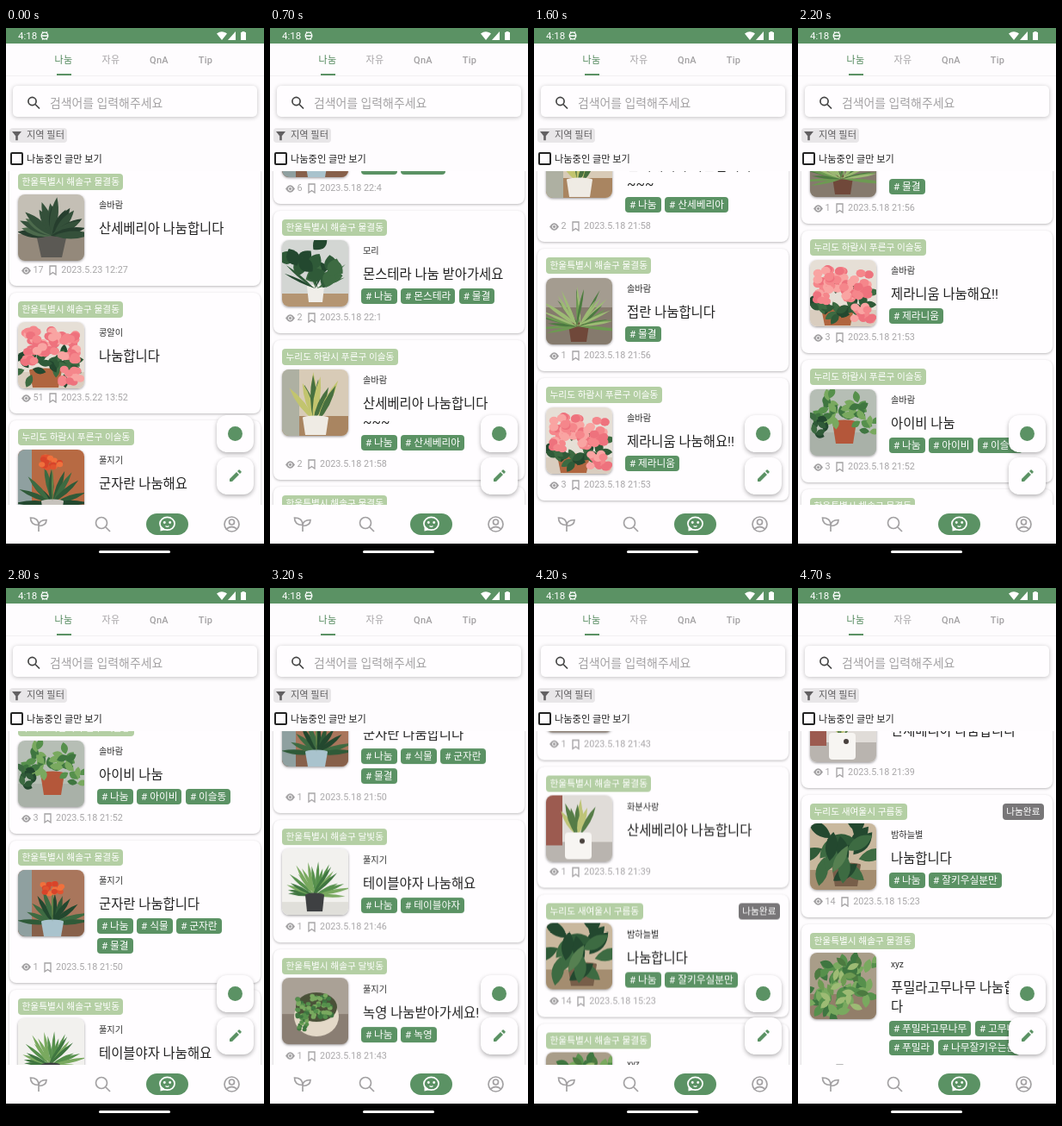
An HTML page that plays this animation: 300x617 px, repeating every 4.8 s.

```html
<!DOCTYPE html>
<html lang="ko">
<head>
<meta charset="utf-8">
<title>나눔 게시판</title>
<style>
  :root { --green: #5b9264; --light: #b4cfa4; --paper: #fefcfe; }
  html, body { margin: 0; width: 100%; height: 100%; overflow: hidden; }
  body {
    position: relative; background: var(--paper); color: #222;
    font: 11px/20px Roboto, "Noto Sans CJK KR", "Noto Sans KR", "Noto Sans CJK", sans-serif;
    white-space: nowrap;
  }
  .at { position: absolute; }
  #ui { position: absolute; left: 0; top: 0; }
  .status { left: 0; top: 0; width: 300px; height: 18px; background: var(--green); }
  .tabs { left: 0; top: 18px; width: 300px; height: 37px; border-bottom: 1px solid #f2f0f2; }
  .tab { top: 10px; width: 60px; text-align: center; color: #a3a1a3; font-weight: 500; letter-spacing: .3px; }
  .tab.on { color: #4d8557; }
  .tab.on::after {
    content: ""; position: absolute; left: 22px; top: 25px; width: 17px; height: 2px; background: var(--green);
  }
  .search {
    left: 8px; top: 67px; width: 284px; height: 36px; border-radius: 5px; background: #fffdff;
    box-shadow: 0 1px 5px rgba(0, 0, 0, .24);
  }
  .filter { left: 4px; top: 116px; width: 67px; height: 17px; border-radius: 4px; background: #e8e6e8; }
  .check { left: 5px; top: 144px; width: 11px; height: 11px; border: 2px solid #222; border-radius: 2px; }

  .view { left: 0; top: 166px; width: 300px; height: 387px; overflow: hidden; }
  .list { padding-top: 1px; margin-top: -8px; animation: scroll 4.8s -5ms infinite; }
  .card {
    position: relative; box-sizing: border-box; width: 292px; min-height: 140px; margin: 0 4px 8px;
    padding: 37px 0 34px 104px; border-radius: 8px; background: #fffdff;
    box-shadow: 0 1px 3px rgba(0, 0, 0, .27);
  }
  .place, .done {
    position: absolute; top: 10px; height: 19px; padding: 0 4.5px; border-radius: 4px;
    color: #fff; font-size: 10.7px;
  }
  .place { left: 10px; background: var(--light); }
  .done { right: 10px; background: #787678; }
  .photo {
    position: absolute; left: 9.5px; top: 33.5px; width: 77px; height: 77px; border-radius: 8px;
    box-shadow: 0 1px 3px rgba(0, 0, 0, .4);
  }
  .early { animation: swap 4.8s -5ms step-end infinite; }
  .user { height: 26px; font-size: 10.2px; color: #333; }
  .line { font-size: 15.4px; line-height: 22px; }
  .line.short { line-height: 20px; }
  .tags { margin: 5px 0 0 -2px; }
  .row { display: flex; gap: 4.5px; height: 18px; }
  .row + .row { margin-top: 4.5px; }
  .tag { padding: 0 5px; border-radius: 4px; background: var(--green); color: #fff; font-size: 11.7px; line-height: 18px; }
  .meta {
    position: absolute; left: 14px; bottom: 8px; display: flex; align-items: center;
    color: #a8a6a8; font-size: 10.8px;
  }
  .meta svg { margin-right: 2.5px; }
  .meta svg + span + svg { margin: 0 4px 0 5.5px; }

  .fab {
    left: 245px; width: 43px; height: 43px; border-radius: 12px; background: #fffdff;
    box-shadow: 0 2px 5px rgba(0, 0, 0, .3);
  }
  .bottom { left: 0; top: 553px; width: 300px; height: 46px; background: #fffdff; }
  .home { left: 0; top: 598px; width: 300px; height: 19px; background: #000; }

  @keyframes scroll {
    0%       { transform: translateY(0); animation-timing-function: steps(7); }
    14.5833% { transform: translateY(-541px); animation-timing-function: steps(9); }
    33.3333% { transform: translateY(-817px); animation-timing-function: steps(6); }
    45.8333% { transform: translateY(-988px); animation-timing-function: steps(6); }
    58.3333% { transform: translateY(-1230px); animation-timing-function: steps(9); }
    77.0833% { transform: translateY(-1673px); animation-timing-function: steps(10); }
    97.9166%, 100% { transform: translateY(-1904px); }
  }
  @keyframes swap { 0% { opacity: 1; } 79.1666%, 100% { opacity: 0; } }
</style>
</head>
<body>
<div class="at view"><div class="list" id="list"></div></div>

<div class="at status"></div>
<div class="at" style="left:14px;top:-1px;color:#fff;font-size:11.5px">4:18</div>
<div class="at tabs">
  <div class="at tab on" style="left:37px">나눔</div>
  <div class="at tab" style="left:92px">자유</div>
  <div class="at tab" style="left:148px">QnA</div>
  <div class="at tab" style="left:202px">Tip</div>
</div>
<div class="at search"></div>
<div class="at" style="left:51px;top:77px;font-size:13.9px;color:#a3a1a3">검색어를 입력해주세요</div>
<div class="at filter"></div>
<div class="at" style="left:24px;top:115px;font-size:11.2px;color:#626062">지역 필터</div>
<div class="at check"></div>
<div class="at" style="left:24px;top:143px;font-size:11.2px">나눔중인 글만 보기</div>
<div class="at fab" style="top:449px"></div>
<div class="at fab" style="top:498px"></div>
<div class="at bottom"></div>
<div class="at home"></div>

<svg id="ui" width="300" height="617" fill="none">
  <g fill="#fff">
    <path d="M245 6.5q6-4.5 12 0l-6 7.5zM267 4v10h-9zM273 5h1.5v-1h3v1H279v9h-6z"/>
    <rect x="108" y="606" width="83" height="3" rx="1.5"/>
  </g>
  <g stroke="#fff" stroke-width="1.3">
    <circle cx="45" cy="9" r="3.8"/>
    <path d="M41 9h8M42 4.5l1.5 1.5M48 4.5L46.5 6M42 13.5l1.5-1.5M48 13.5L46.5 12"/>
  </g>
  <g stroke="#444" stroke-width="1.7"><circle cx="30.5" cy="85" r="4.6"/><path d="M34 88.5l5 5"/></g>
  <path d="M7 120h11l-4.200 5.200v5h-2.600v-5z" fill="#626062"/>
  <circle cx="266.5" cy="470.5" r="8.5" fill="#5b9264"/>
  <path d="M260 523v3h3l8-8-3-3zM269 514l3 3 1.5-1.5q.6-.6 0-1.2l-1.8-1.8q-.6-.6-1.2 0z" fill="#5b9264"/>
  <g stroke="#a3a1a3" stroke-width="1.7">
    <path d="M38 584v-8M28.5 568c6 0 9.5 3 9.5 8.5-6 0-9.5-3-9.5-8.5zM47 570.5c-5.5 0-9 2-9 7 5.5 0 9-2 9-7z"/>
    <circle cx="111" cy="574" r="6.5"/><path d="M116 579l5 5"/>
    <circle cx="262.5" cy="575.5" r="8.5"/><circle cx="262.5" cy="573" r="3"/>
    <path d="M256.5 581q6-5 12 0"/>
  </g>
  <rect x="163" y="563" width="49" height="25" rx="12.5" fill="#5b9264"/>
  <ellipse cx="187.5" cy="574.8" rx="8.6" ry="7.4" stroke="#fff" stroke-width="1.7"/>
  <path d="M179.500 577v6.500l6-1.500z" fill="#fff"/>
  <path d="M185.500 577.500q2 1.600 4 0" stroke="#fff" stroke-width="1.300"/>
  <circle cx="184.300" cy="573.500" r="1.400" fill="#fff"/><circle cx="190.700" cy="573.500" r="1.400" fill="#fff"/>
</svg>

<script>
let seed = 7;
const rnd = (a, b) => {
  seed = (seed * 16807) % 2147483647;
  return a + (b - a) * seed / 2147483647;
};
const pick = list => list[Math.floor(rnd(0, list.length))];
const times = (n, fn) => Array.from({ length: n }, (_, i) => fn(i)).join('');

// Drawing helpers for the plant pictures, on a 77 x 77 square
const box = (x, y, w, h, fill, r = 0) =>
  `<rect x="${x}" y="${y}" width="${w}" height="${h}" rx="${r}" fill="${fill}"/>`;
const oval = (x, y, rx, ry, fill) => `<ellipse cx="${x}" cy="${y}" rx="${rx}" ry="${ry}" fill="${fill}"/>`;
const room = (wall, floor, y) => box(0, 0, 77, 77, wall) + box(0, y, 77, 77 - y, floor);
const pot = (x, y, top, bottom, h, fill) =>
  `<path d="M${x - top} ${y}h${2 * top}L${x + bottom} ${y + h}h${-2 * bottom}z" fill="${fill}"/>` +
  oval(x, y, top, 2.5, fill);
const leaf = (x, y, turn, len, w, fill) =>
  `<path transform="translate(${x} ${y}) rotate(${turn})" fill="${fill}"
    d="M0 0Q${w} ${-len / 2} 0 ${-len}Q${-w} ${-len / 2} 0 0"/>`;
const fan = (x, y, n, len, w, spread, fills) => times(n, i =>
  leaf(x + rnd(-3, 3), y, -spread + 2 * spread * i / (n - 1) + rnd(-6, 6), len * rnd(.75, 1.05), w, pick(fills)));
const bush = (x, y, rx, ry, n, len, w, fills) => times(n, () =>
  leaf(x + rnd(-rx, rx), y + rnd(-ry, ry), rnd(0, 360), len, w, pick(fills)));
const blooms = (x, y, rx, ry, n, r, fills) => times(n, () =>
  oval(x + rnd(-rx, rx), y + rnd(-ry, ry), r, r * .85, pick(fills)));

const dark = ['#23482f', '#2f5a38', '#3d6b42'];
const mid = ['#3f7640', '#56904c', '#79a95f'];
const pale = ['#6d9a52', '#9dbb74', '#4c7a40'];
const pinks = ['#f5868b', '#f9a4a2', '#ee727d'];
const reds = ['#e0532f', '#f0703c', '#d8442a'];

const geranium = () => room('#e6dfd6', '#d9cdbf', 58) + pot(32, 56, 19, 15, 20, '#b0653f') +
  bush(36, 48, 32, 14, 34, 16, 8, dark) + blooms(24, 23, 16, 14, 34, 5.5, pinks) +
  blooms(54, 30, 15, 15, 30, 5.5, pinks) + blooms(62, 62, 11, 8, 14, 5, pinks) + blooms(12, 43, 7, 5, 8, 5, pinks);
const clivia = (wall, top, potFill) => room(wall, '#87604a', 60) + box(0, 0, 16, 77, '#8fa0a0') +
  fan(40, 62, 11, 44, 6, 88, dark) + pot(40, 60, 13, 10, 17, potFill) +
  leaf(40, 60, 0, 40, 2, '#628448') + blooms(39, top, 12, 7, 20, 3.6, reds);

const plants = {
  rosette: () => room('#c4bfb5', '#94897b', 46) + pot(39, 46, 18, 12, 27, '#5b5954') +
    fan(39, 48, 17, 44, 9, 88, ['#263e2e', '#34503a', '#4c6a4c']),
  geranium,
  cliviaA: () => clivia('#b76a43', 14, '#c7c3bd'),
  cliviaB: () => clivia('#a9765c', 21, '#a9c3cd'),
  monstera: () => room('#d3d6d3', '#b49572', 62) + pot(39, 54, 10, 8, 18, '#f0eee9') +
    fan(39, 56, 8, 42, 3, 65, dark) + bush(38, 28, 22, 17, 17, 22, 15, dark),
  tall: () => room('#d8cbb7', '#a98561', 54) + box(0, 0, 20, 77, '#aeb0a2') +
    fan(39, 60, 11, 56, 7, 32, ['#47703f', '#c2c46e', '#2f5636']) + pot(39, 56, 15, 12, 20, '#efebe4'),
  spider: () => room('#a49c90', '#857a6d', 34) + pot(38, 54, 12, 9, 20, '#70483a') +
    fan(38, 56, 30, 46, 3, 100, pale),
  ivy: () => room('#b6beb5', '#a9b1a8', 50) + pot(40, 38, 14, 10, 25, '#b4573a') +
    bush(38, 25, 28, 15, 32, 14, 8, mid) + bush(12, 43, 8, 12, 9, 12, 7, dark) + bush(64, 44, 8, 14, 9, 12, 7, mid),
  palm: () => room('#f2f1ee', '#e0dfda', 62) + fan(38, 54, 20, 38, 4, 92, mid) +
    pot(38, 54, 11, 9, 19, '#3e4042'),
  beads: () => room('#aaa196', '#8a7e73', 42) + oval(40, 45, 26, 23, '#e4d9c8') + oval(40, 34, 24, 17, '#4a5138') +
    blooms(38, 34, 20, 14, 70, 2.8, mid) + blooms(24, 50, 5, 12, 16, 2.5, mid),
  cube: () => room('#e0dcd8', '#b9b4af', 54) + box(0, 0, 19, 58, '#9c5b50') +
    fan(37, 46, 9, 40, 6, 30, ['#567d47', '#bec477', '#3a6440']) + box(22, 43, 31, 31, '#f7f5f2', 4) +
    oval(42, 53, 3, 3, '#49413d'),
  grassy: () => room('#b7b4a8', '#8c8b7b', 48) + box(0, 0, 14, 77, '#6f6e60') +
    fan(38, 56, 24, 46, 3.5, 95, mid) + pot(38, 56, 13, 10, 20, '#d8d3c8'),
  rubber: () => room('#c9b89e', '#a48d70', 54) + pot(42, 48, 17, 13, 25, '#775e49') +
    bush(37, 33, 24, 22, 18, 34, 14, dark) + leaf(26, 57, 30, 36, 11, '#568051'),
  creeper: () => room('#a99d89', '#927e69', 48) + bush(38, 37, 34, 32, 60, 17, 9, mid) +
    bush(38, 42, 28, 28, 20, 15, 7, pale)
};
const picture = (kind, extra = '') =>
  `<svg class="photo ${extra}" viewBox="0 0 77 77">${plants[kind]()}</svg>`;

const eye = `<svg width="11" height="9" viewBox="0 0 11 9"><path d="M0 4.5Q5.5-4 11 4.5Q5.5 13 0 4.5" fill="#a3a1a3"/>
  <circle cx="5.5" cy="4.5" r="2.1" fill="#a3a1a3" stroke="#fff"/></svg>`;
const mark = `<svg width="11" height="12" viewBox="0 0 11 12"><path d="M2 1h7v10L5.5 8.5 2 11z"
  fill="none" stroke="#a3a1a3" stroke-width="1.3"/></svg>`;

const south = '한울특별시 해솔구 물결동';
const moon = '한울특별시 해솔구 달빛동';
const dew = '누리도 하람시 푸른구 이슬동';
const cloud = '누리도 새여울시 구름동';

// place, user, title, tags (rows split by /), views, date, picture, finished
const posts = [
  [south, '솔바람', '산세베리아 나눔합니다', '', 17, '23 12:27', 'rosette'],
  [south, '콩알이', '나눔합니다', '', 51, '22 13:52', 'geranium'],
  [dew, '풀지기', '군자란 나눔해요', '', 27, '21 16:30', 'cliviaA'],
  [dew, '풀지기', '군자란 나눔합니다', '나눔,군자란', 6, '18 22:4', 'cliviaB'],
  [south, '모리', '몬스테라 나눔 받아가세요', '나눔,몬스테라,물결', 2, '18 22:1', 'monstera'],
  [dew, '솔바람', '산세베리아 나눔합니다\n~~~', '나눔,산세베리아', 2, '18 21:58', 'tall'],
  [south, '솔바람', '접란 나눔합니다', '물결', 1, '18 21:56', 'spider'],
  [dew, '솔바람', '제라니움 나눔해요!!', '제라니움', 3, '18 21:53', 'geranium'],
  [dew, '솔바람', '아이비 나눔', '나눔,아이비,이슬동', 3, '18 21:52', 'ivy'],
  [south, '풀지기', '군자란 나눔합니다', '나눔,식물,군자란/물결', 1, '18 21:50', 'cliviaB'],
  [moon, '풀지기', '테이블야자 나눔해요', '나눔,테이블야자', 1, '18 21:46', 'palm'],
  [moon, '풀지기', '녹영 나눔받아가세요!', '나눔,녹영', 1, '18 21:43', 'beads'],
  [south, '화분사랑', '산세베리아 나눔합니다', '', 1, '18 21:39', 'cube'],
  [cloud, '밤하늘별', '나눔합니다', '나눔,잘키우실분만', 14, '18 15:23', 'rubber', true],
  [south, 'xyz', '푸밀라고무나무 나눔합니\n다', '푸밀라고무나무,고무나무/푸밀라,나무잘키우는분', 9, '18 14:37', 'creeper']
];

const tagRow = row =>
  `<div class="row">${row.split(',').map(tag => `<span class="tag"># ${tag}</span>`).join('')}</div>`;
const titleLine = text => `<div class="line ${text[0] === '~' ? 'short' : ''}">${text}</div>`;

document.getElementById('list').innerHTML = posts.map(
  ([place, user, title, tags, views, date, kind, finished]) => `<div class="card">
    <div class="place">${place}</div>
    ${finished ? '<div class="done">나눔완료</div>' : ''}
    ${picture(kind)}${finished ? picture('grassy', 'early') : ''}
    <div class="user">${user}</div>
    ${title.split('\n').map(titleLine).join('')}
    ${tags && `<div class="tags">${tags.split('/').map(tagRow).join('')}</div>`}
    <div class="meta">${eye}<span>${views}</span>${mark}<span>2023.5.${date}</span></div>
  </div>`).join('');
</script>
</body>
</html>
```
